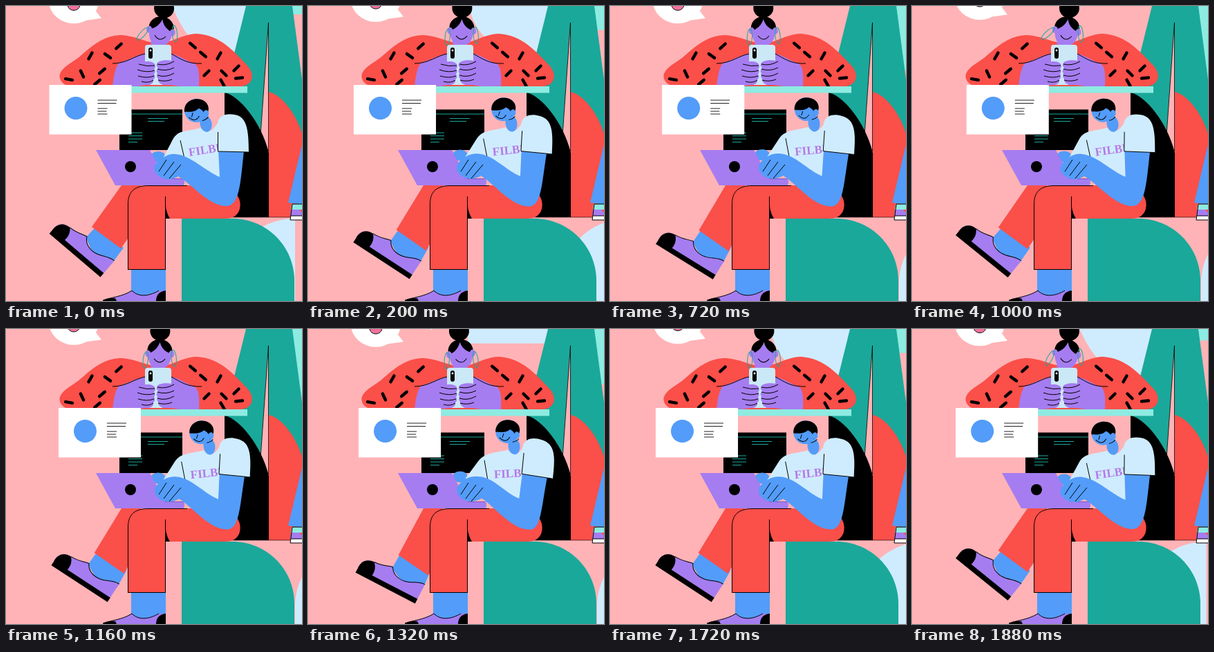
Animation of 428 by 426 pixels, one loop 1.92 s. Source, as an HTML page with a canvas:

```html
<!DOCTYPE html>
<html lang="en">
<head>
<meta charset="utf-8">
<title>Working and chatting</title>
<style>
html, body { margin: 0; width: 100%; height: 100%; overflow: hidden; background: #ffb3b6; }
canvas { display: block; }
</style>
</head>
<body>
<canvas id="stage" width="428" height="426"></canvas>
<script>
const ctx = document.getElementById('stage').getContext('2d');
const PINK = '#ffb3b6', RED = '#fb4f49', TEAL = '#1aa89a', CYAN = '#8eebe1', BLUE = '#539cf9',
      PURPLE = '#a57df0', ICE = '#cfecfe', BLACK = '#000', WHITE = '#fff';
const LOOP = 1920, STEP = 40;

const lerp = (a, b, k) => a + (b - a) * k;
const clamp = v => Math.max(0, Math.min(1, v));
const triangle = p => 1 - Math.abs(1 - 2 * (p % 1));

function fill(d, color) {
  ctx.fillStyle = color;
  ctx.fill(new Path2D(d));
}
function line(d, color = BLACK, width = 1) {
  ctx.strokeStyle = color;
  ctx.lineWidth = width;
  ctx.stroke(new Path2D(d));
}
function rect(x, y, w, h, color) {
  ctx.fillStyle = color;
  ctx.fillRect(x, y, w, h);
}
function roundRect(x, y, w, h, r, color) {
  ctx.fillStyle = color;
  ctx.beginPath();
  ctx.roundRect(x, y, w, h, r);
  ctx.fill();
}
function oval(x, y, rx, ry, color, turn = 0) {
  ctx.fillStyle = color;
  ctx.beginPath();
  ctx.ellipse(x, y, rx, ry, turn, 0, 7);
  ctx.fill();
}
function group(x, y, degrees, draw) {
  ctx.save();
  ctx.translate(x, y);
  ctx.rotate(degrees * Math.PI / 180);
  draw();
  ctx.restore();
}
// Blend two paths that share the same commands
function mix(a, b, k) {
  const to = b.match(/-?[\d.]+/g);
  let i = 0;
  return a.replace(/-?[\d.]+/g, n => lerp(+n, +to[i++], k).toFixed(2));
}

function background(t, q) {
  rect(0, 0, 428, 426, PINK);
  const away = Math.min(t, LOOP - t), early = t < LOOP / 2;

  const bottom = 106 - away * (early ? 0.158 : 0.142);
  const r = 160 * clamp((360 - away) / 280);
  if (bottom > 0)
    fill(`M231 -70V${bottom - r}A${r} ${r} 0 0 0 ${231 + r} ${bottom}H400V-70Z`, ICE);

  rect(405, 0, 23, 12 + 108 * q, CYAN);
  fill('M347 0H414L441 204V304H316V125Z', TEAL);
  fill('M379.5 24L368 186L380 214Z', PINK);
  line('M379.5 24L368 187M379.5 24V210', BLACK, 0.8);
  fill('M316 125C338 130 369 168 380 212V305H316Z', BLACK);
  fill('M380 124C400 129 419 156 428 184V305H380Z', RED);

  const x = Math.min(418, 322 + away * (early ? 0.22 : 0.188));
  fill(`M${x} 430V400C${x} 349 ${x + 42} 307 ${x + 96} 307V430Z`, ICE);
  fill('M254 307H327C377 307 417 347 417 397V426H254Z', TEAL);
  line('M230 305H428', BLACK, 0.6);

  fill('M430 192L408 284L430 287Z', BLUE);
  fill('M413 286H430V294H412Z', CYAN);
  fill('M412 294H424Q428 297 430 303H411Z', PURPLE);
  rect(411, 303, 17, 6, WHITE);
  line('M428 286H414L411 309H428M412 303H428');
}

function bubbles(t, k) {
  ctx.save();
  ctx.translate(0, -6 * triangle((t + 600) / 640));
  oval(98, -7, 36, 33, WHITE);
  fill('M112 22L138 18.5L126 3Z', WHITE);
  oval(98, -2, 9, 9, '#f4719f');
  line('M89 -2C89 10 107 10 107 -2');
  ctx.restore();
  const tip = -4 + 7.6 * k;
  fill(`M150 ${tip - 12}L180 ${tip}L170 ${tip - 14}Z`, WHITE);
}

function earring(x, y, degrees) {
  group(x, y, degrees, () => {
    ctx.strokeStyle = TEAL;
    ctx.lineWidth = 1;
    ctx.beginPath();
    ctx.ellipse(0, 11, 3.6, 12, 0, 0, 7);
    ctx.stroke();
  });
}

function woman(t, k) {
  fill('M165 42C190 43 200 53 222 54C240 53 254 41 276 40C310 42 330 66 349 86C360 98 358 114 340 116H97C80 116 76 104 78 98C83 86 97 82 110 70C130 52 145 43 165 42Z', RED);
  const seeds = [[122,72,-60],[147,72,35],[163,58,-42],[91,106,10],[110,98,65],[139,94,-40],[132,110,-40],
                 [270,57,40],[285,70,40],[308,72,-60],[290,97,-45],[315,97,45],[333,90,-45],[313,111,60],[337,104,-5]];
  ctx.lineCap = 'round';
  for (const [x, y, a] of seeds) group(x, y, a, () => line('M-5 0H5', BLACK, 4.4));
  ctx.lineCap = 'butt';

  oval(220, 53, 11, 6, PURPLE);
  group(222, 50, lerp(8, -8.5, k), () => {
    oval(0, -47, 14.5, 14, BLACK);
    oval(0, -19, 18, 16, BLACK);
    oval(-17, -14, 4, 5, PURPLE);
    oval(17, -14, 4, 5, PURPLE);
    fill('M0 -31C-4 -20 -10 -17 -17 -14C-16 5 -7 7 0 7C8 7 16 4 17 -14C10 -17 3 -20 0 -31Z', PURPLE);
    line('M-8 -7Q0 3 8 -7');
  });
  const swing = peak => Math.max(0, Math.cos((t - peak) / 480 * Math.PI)) ** 4;
  earring(lerp(205, 200, k), 32 + 4 * k, 45 * swing(40) + 3);
  earring(lerp(243, 240, k), 29 + 6 * k, -50 * swing(520) - 5);

  fill('M154 116C156 100 158 87 164 82C180 77 190 70 202 69V114C190 117 170 116 154 116Z', PURPLE);
  fill('M279 116C280 100 279 89 274 84C262 80 250 71 239 69V114C250 117 262 116 279 116Z', PURPLE);
  line('M154 83C175 83 187 71 202 69M239 69C252 76 262 84 283 83');
  roundRect(201, 56, 38, 58, 4, '#cbe8f7');
  roundRect(206, 60, 6, 16, 3, BLACK);
  oval(209, 64, 1.5, 1.5, WHITE);
  fill('M190 83C200 79 212 79 215 84Q217 89 214 91Q217 95 214 98Q217 103 213 106Q214 112 207 114H190Z', PURPLE);
  fill('M250 83C240 77 224 77 219 82Q216 86 220 89Q216 94 219 97Q217 102 220 105Q219 111 227 114H250Z', PURPLE);
  line('M192 84Q204 88 215 86M190 92Q204 97 215 93M191 101Q204 105 214 101M196 109Q206 112 213 107M243 80Q231 87 219 84M243 89Q231 95 219 91M243 97Q231 104 219 100M240 106Q230 110 220 107');
  rect(100, 116, 249, 9.5, CYAN);
}

function panels(q) {
  rect(164, 149.5, 91, 58.5, BLACK);
  line('M164 156H255M205 162.5H234M205 166.5H229M177 183H197M177 187.5H197M177 192H197M177 196.5H190', TEAL);
  ctx.save();
  ctx.translate(62.5 + 17 * q, 0);
  rect(0, 114, 119, 71.5, WHITE);
  oval(38.5, 147.5, 16.5, 16.5, BLUE);
  line('M70 136H98M70 140.5H97M70 148H84M70 152H83M70 156H84', '#222');
  ctx.restore();
}

function rearLeg(k) {
  group(lerp(136.5, 161, k), lerp(391.5, 398, k), lerp(40.4, 23, k), () => {
    fill('M-52 -54H-2L0 -26L-30 -18L-53 -30Z', BLUE);
    const top = 'C-68 -26 -62 -30 -53 -32C-47 -21 -35 -20 -27 -22C-17 -24 -11 -31 0 -31';
    fill(`M-97 -7C-98 -19 -91 -26 -80 -26${top}V-7Z`, PURPLE);
    line('M-80 -26' + top);
    fill('M-97 -7C-98 -19 -91 -26 -80 -26C-74 -20 -73 -14 -74 -7Z', BLACK);
    rect(-97, -7.5, 97, 7.5, BLACK);
  });
  fill(mix('M167 259L124 319L166 350L195 310V259Z', 'M167 259L133 329L177 358L195 310V259Z', k), RED);
}

function legs(k) {
  rearLeg(k);
  rect(181, 379, 50, 40, BLUE);
  const top = 'C150 421 168 420 182 411C193 422 209 418 221 411';
  fill(`M140 426${top}H231V426Z`, PURPLE);
  line('M140 425' + top);
  fill('M217 426C217 418 221 412 231 411V426Z', BLACK);
  fill('M140 426Q146 421 158 422L160 426Z', BLACK);
  fill('M176 381V286C176 267 187 259 206 259H315C333 265 343 281 337 296C333 304 327 307 316 307H231V381Z', RED);
  line('M176.5 380V286C176.5 267 187 259.5 206 259.5H262M176 380.5H231M230.5 275V380');
  fill('M230 276Q230 297 237 307H230Z', BLACK);
}

function head(k) {
  group(lerp(289, 301, k), lerp(170, 169, k), lerp(-12, -4, k), () => oval(0, 0, 8.5, 12, BLUE));
  group(lerp(275, 292.5, k), lerp(151, 147, k), lerp(-3, 3, k), () => {
    oval(0, 0, 17, 17, BLUE);
    fill('M-17 1C-18 -22 17 -22 18 -3C18 4 15 7 12 10C12 4 10 0 4 -3C-3 3 -10 1 -17 1Z', BLACK);
    oval(14, 5, 4, 5, BLUE);
    line('M-11 9Q-2 18 4 8M-5 3L-7 9M8 15Q14 14 17 10');
  });
}

function man(k) {
  legs(k);
  oval(220, lerp(218, 212, k), 11, 8, BLUE);
  fill(mix('M281 176C262 182 249 178 241 193L226 222L255 236L310 250L330 215L307 168L300 177C296 182 286 182 281 176Z',
           'M292 174C272 178 258 179 248 190L228 214L257 240L308 248L332 215L314 170L310 175C305 182 296 181 292 174Z', k), ICE);
  line(mix('M252 194L258 220', 'M256 188L260 215', k));

  group(lerp(265, 270.5, k), lerp(217, 215, k), lerp(-9, -1, k), () => {
    ctx.fillStyle = '#b679e6';
    ctx.font = 'bold 17px "Liberation Serif", "Noto Serif", serif';
    ctx.fillText('FILBU', 0, 0);
  });
  head(k);

  fill('M130 208H208L230 249H257Q259 254 257 259H158Z', PURPLE);
  line('M230 249.5H256', '#7d59c7');
  oval(180, 232, 8, 8, BLACK);

  fill(mix('M307 208L309 247C288 238 267 216 246 214C235 212 225 219 217 228C211 235 216 243 224 247C231 252 241 251 249 246C270 258 292 288 318 289C338 289 339 255 344 209Z',
           'M311 207L304 244C286 238 270 215 250 213C238 211 227 214 220 222C212 232 217 242 225 246C232 250 243 249 252 244C272 258 295 290 321 290C337 290 336 262 347 213Z', k), BLUE);
  line('M221 239L232 222M228 245L243 225M236 249L253 229');
  fill(mix('M306 168C309 156 322 155 331 157C348 160 351 178 351 211L306 210Z',
           'M312 170C316 156 330 157 340 161C361 168 360 186 355 218L310 209Z', k), ICE);
  line(mix('M306.5 182L306.5 210L351 211', 'M314 178L310 209L355 218', k));
}

function render(now) {
  const t = Math.floor(now / STEP) * STEP % LOOP;
  const k = triangle(t / 960), q = triangle(t / LOOP);
  background(t, q);
  bubbles(t, k);
  woman(t, k);
  panels(q);
  man(k);
}

const start = performance.now();
function loop() {
  render(performance.now() - start);
  requestAnimationFrame(loop);
}
loop();
</script>
</body>
</html>
```
